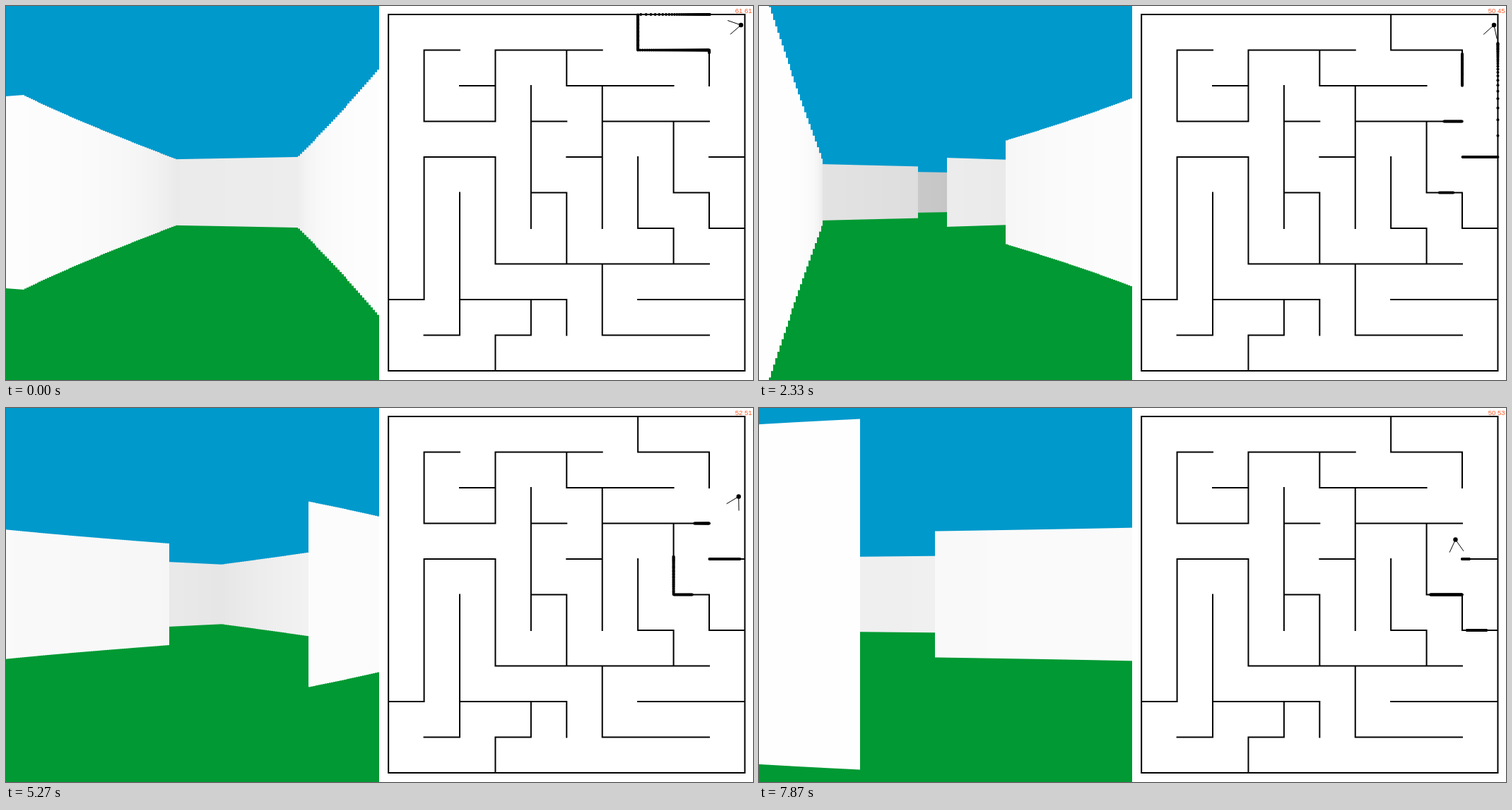
Animation of 1057 by 530 pixels, one loop 8 s. Source, as an HTML page with a canvas:

```html
<!DOCTYPE html>
<html lang="en">
<head>
<meta charset="utf-8">
<title>Maze ray casting</title>
<style>
  html, body { margin: 0; width: 100%; height: 100%; overflow: hidden; background: #fff; }
  canvas { display: block; }
</style>
</head>
<body>
<canvas id="stage" width="1057" height="530"></canvas>
<script>
const ctx = document.getElementById('stage').getContext('2d');
const LOOP = 8000;
const VIEW = { width: 528, horizon: 264, rays: 180, fov: 60, wallScale: 14050 };
const gridX = n => 541.15 + 50.43 * n;
const gridY = n => 12.1 + 50.48 * n;
const rad = deg => deg * Math.PI / 180;
const ramp = (t, from, to) => Math.min(1, Math.max(0, (t - from) / (to - from)));

// Maze strokes in grid units: the frame first, then the walls inside.
const MAZE = 'M0 0H10V10H0V0 M2 1H1V3H3V1H6 M2 2H3 M5 1V2H8 M7 0V1H9V2 M4 2V6 M4 3H5 M4 5H5V7'
  + ' M6 2V6 M6 3H9 M5 4H6 M8 3V5H9V6H10 M9 4H10 M7 4V6H8V7 M0 8H1V4H3V7H9'
  + ' M1 9H2V5 M2 8H5V9 M4 8V9H3V10 M6 7V9H9 M7 8H10';

function traceWalls(path) {
  const walls = [];
  let x = 0, y = 0;
  for (const [, command, a, b] of path.matchAll(/([MHV])(\d+)(?: (\d+))?/g)) {
    const px = x, py = y;
    if (command !== 'V') x = gridX(+a);
    if (command === 'V') y = gridY(+a);
    if (command === 'M') y = gridY(+b);
    else walls.push({ x1: Math.min(x, px), y1: Math.min(y, py), x2: Math.max(x, px), y2: Math.max(y, py) });
  }
  return walls;
}
const walls = traceWalls(MAZE);

// The picture refreshes in steps, half as often once the walk is under way.
function refreshTime(t) {
  const start = t < 3330 ? 1165 : 3330;
  const step = t < 3330 ? 72.8 : 146.4;
  return start + Math.floor((t - start) / step + 0.01) * step;
}

// Turn left, step out, walk down the corridor turning right, then cut west turning back.
function pose(t) {
  const turn = ramp(t, 1100, 2330), step = ramp(t, 2330, 3300);
  const walk = ramp(t, 3330, 5233), bend = ramp(t, 5233, 6259), cross = ramp(t, 6259, 7869);
  return {
    x: 1040 - 4.2 * step + 0.9 * walk - 0.7 * bend - 50.5 * cross,
    y: 27 + 29 * step + 69.5 * walk + 44 * bend + 17 * cross,
    heading: 169 - 61 * turn - 8.8 * step + 19.8 * walk + 33.9 * bend - 68.1 * cross
  };
}

function frameRates(t) {
  const settled = 61 - 8 * ramp(t, 0, 830);
  const dip = ramp(t, 1530, 2330), recovery = ramp(t, 2330, 3300);
  const current = settled - 3 * dip + 4 * recovery - 5 * ramp(t, 4300, 6259) + ramp(t, 6259, 7869);
  const average = settled - 8 * dip + 5 * recovery + 3 * ramp(t, 3330, 7869);
  return `${Math.round(current)} ${Math.round(average)}`;
}

function castRay(x, y, angle) {
  const dx = Math.cos(angle), dy = Math.sin(angle), slack = 0.01;
  let nearest = Infinity;
  for (const w of walls) {
    const d = w.x1 === w.x2 ? (w.x1 - x) / dx : (w.y1 - y) / dy;
    if (!(d > 0 && d < nearest)) continue;
    const hx = x + d * dx, hy = y + d * dy;
    const inside = hx >= w.x1 - slack && hx <= w.x2 + slack && hy >= w.y1 - slack && hy <= w.y2 + slack;
    if (inside) nearest = d;
  }
  return nearest;
}

function dot(x, y, r) {
  ctx.beginPath();
  ctx.arc(x, y, r, 0, 2 * Math.PI);
  ctx.fill();
}

function strokeLines(lines, width, cap) {
  ctx.strokeStyle = '#000';
  ctx.lineWidth = width;
  ctx.lineCap = cap;
  ctx.beginPath();
  for (const l of lines) {
    ctx.moveTo(l.x1, l.y1);
    ctx.lineTo(l.x2, l.y2);
  }
  ctx.stroke();
}

function drawColumn(i, distance) {
  const w = VIEW.width / VIEW.rays;
  const left = Math.floor(i * w), right = Math.floor((i + 1) * w);
  const height = Math.min(VIEW.wallScale / distance, 800);
  const shade = Math.round(255 * (1 - (distance / VIEW.width) ** 2));
  ctx.fillStyle = `rgb(${shade},${shade},${shade})`;
  ctx.fillRect(left, VIEW.horizon - height / 2, right - left, height);
}

function drawPlayer({ x, y, heading }) {
  const sight = [-1, 1].map(side => {
    const a = rad(heading + side * VIEW.fov / 2);
    return { x1: x, y1: y, x2: x + 20 * Math.cos(a), y2: y + 20 * Math.sin(a) };
  });
  strokeLines(sight, 1, 'butt');
  ctx.fillStyle = '#000';
  dot(x, y, 3.2);
}

function draw(t) {
  const player = pose(t);
  ctx.fillStyle = '#fff';
  ctx.fillRect(0, 0, 1057, 530);
  ctx.fillStyle = '#09c';
  ctx.fillRect(0, 0, VIEW.width, VIEW.horizon);
  ctx.fillStyle = '#093';
  ctx.fillRect(0, VIEW.horizon, VIEW.width, 530 - VIEW.horizon);
  strokeLines(walls, 2, 'square');

  for (let i = 0; i < VIEW.rays; i++) {
    const offset = (i / VIEW.rays - 0.5) * VIEW.fov;
    const angle = rad(player.heading + offset);
    const d = castRay(player.x, player.y, angle);
    if (d === Infinity) continue;
    drawColumn(i, d * Math.cos(rad(offset)));
    ctx.fillStyle = '#000';
    dot(player.x + d * Math.cos(angle), player.y + d * Math.sin(angle), 2);
  }

  drawPlayer(player);
  ctx.fillStyle = '#ff5722';
  ctx.font = '9.5px "Liberation Sans", Arial, sans-serif';
  ctx.textAlign = 'right';
  ctx.fillText(frameRates(t), 1055.5, 10);
}

const begin = performance.now();
function tick() {
  draw(refreshTime((performance.now() - begin) % LOOP));
  requestAnimationFrame(tick);
}
tick();
</script>
</body>
</html>
```
